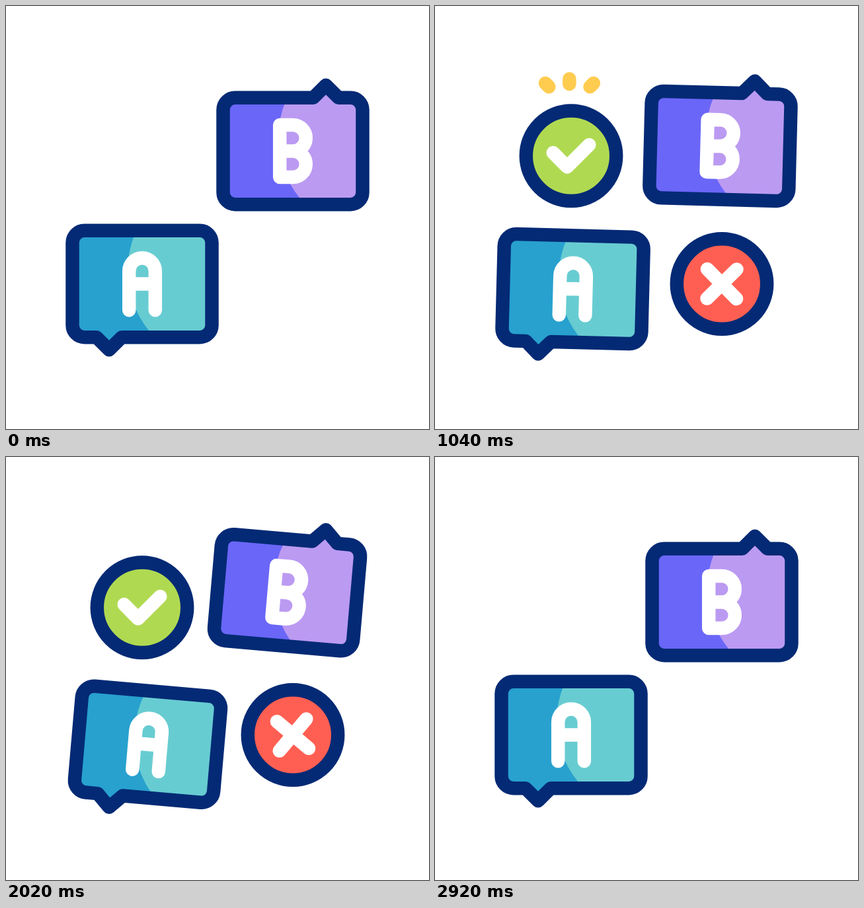
Recreate the animation shown at these times as an HTML page with a canvas. Size 640 px wide and 640 px high, loop 3.6 s.

```html
<!DOCTYPE html>
<html lang="en">
<head>
<meta charset="utf-8">
<title>A or B</title>
<style>
  html, body { margin: 0; width: 100%; height: 100%; overflow: hidden; background: #fff; }
  canvas { display: block; width: 100vmin; height: 100vmin; }
</style>
</head>
<body>
<canvas id="stage" width="640" height="640"></canvas>
<script>
const ctx = document.getElementById('stage').getContext('2d');
const LOOP = 3600, STEP = 20;
const NAVY = '#042a75', LINE = 20.5;
const BURSTS = [50, 80, 110];

const ease = t => {
  t = Math.min(1, Math.max(0, t));
  return t * t * (3 - 2 * t);
};
const span = (f, from, to) => ease((f - from) / (to - from));

// Eased interpolation through [frame, value] keys
function track(keys, f) {
  let value = keys[0][1];
  for (let i = 1; i < keys.length; i++) {
    const [f0, v0] = keys[i - 1], [f1, v1] = keys[i];
    if (f >= f0) value = v0 + (v1 - v0) * span(f, f0, f1);
  }
  return value;
}

const tilt = [[0, 0], [20, 5], [40, -5], [60, 5], [80, -5], [100, 5], [120, 0]];
const hop = [0, 1, 0, 1, 0, 1, 0].map((v, i) => [i * 20, v * 9.6]);
const tickY = [[17, 420.5], [50, 227.8]];
const crossY = [[20, 214.5], [50, 420.5], [120, 420.5], [150, 214.5]];
const crossTurn = [];
for (const b of BURSTS) {
  tickY.push([b, 227.8], [b + 10, 217.2]);
  if (b < 110) tickY.push([b + 20, 227.8]);
  crossTurn.push([b, 0], [b + 10, 5], [b + 20, -5], [b + 30, 0]);
}
tickY.push([121.4, 217.2], [150, 420.5]);

// Bubble outline, with the tail tip at the origin
const bubble = new Path2D();
{
  const l = -55.5, r = 155.5, t = -180.5, b = -19.1, q = 18.2;
  bubble.moveTo(0, 0);
  bubble.lineTo(b, b);
  bubble.arcTo(l, b, l, t, q);
  bubble.arcTo(l, t, r, t, q);
  bubble.arcTo(r, t, r, b, q);
  bubble.arcTo(r, b, l, b, q);
  bubble.lineTo(-b, b);
  bubble.closePath();
}
const flipped = new Path2D();
flipped.addPath(bubble, new DOMMatrix([-1, 0, 0, -1, 0, 0]));

// Letters, relative to the bubble centre
const letterA = new Path2D();
letterA.moveTo(-19.8, 39.8);
letterA.lineTo(-19.8, -19.4);
letterA.arc(0, -19.4, 19.8, Math.PI, 0);
letterA.lineTo(19.8, 39.8);
letterA.moveTo(-19.8, 0);
letterA.lineTo(19.8, 0);

const letterB = new Path2D();
letterB.moveTo(-19.8, 0);
letterB.lineTo(-19.8, -39.6);
letterB.lineTo(0, -39.6);
letterB.arc(0, -19.8, 19.8, -Math.PI / 2, Math.PI / 2);
letterB.arc(0, 19.8, 19.8, -Math.PI / 2, Math.PI / 2);
letterB.lineTo(-19.8, 39.6);
letterB.closePath();
letterB.moveTo(-19.8, 0);
letterB.lineTo(0, 0);

const tick = new Path2D('M-27.3-4.7L-6.2 16.7L27.3-16.8');
const cross = new Path2D('M-22.3-22.3L22.3 22.3M22.3-22.3L-22.3 22.3');

const rays = [
  [203.3, 117.9, 0, -1],
  [172.3, 122.2, -Math.SQRT1_2, -Math.SQRT1_2],
  [234.5, 122.2, Math.SQRT1_2, -Math.SQRT1_2]
];

function stroke(path, color) {
  ctx.strokeStyle = color;
  ctx.stroke(path);
}

function drawBubble(x, y, deg, shape, cx, cy, dark, light, letter) {
  ctx.save();
  ctx.translate(x, y);
  ctx.rotate(deg * Math.PI / 180);
  ctx.fillStyle = dark;
  ctx.fill(shape);
  ctx.save();
  ctx.clip(shape);
  ctx.beginPath();
  ctx.arc(cx + 123, cy - 20.3, 145, 0, Math.PI * 2);
  ctx.fillStyle = light;
  ctx.fill();
  ctx.restore();
  stroke(shape, NAVY);
  ctx.translate(cx, cy);
  stroke(letter, '#fff');
  ctx.restore();
}

function drawBadge(x, y, color, mark, deg) {
  ctx.save();
  ctx.translate(x, y);
  ctx.beginPath();
  ctx.arc(0, 0, 68.2, 0, Math.PI * 2);
  ctx.fillStyle = color;
  ctx.fill();
  ctx.strokeStyle = NAVY;
  ctx.stroke();
  ctx.rotate(deg * Math.PI / 180);
  stroke(mark, '#fff');
  ctx.restore();
}

function drawRays(f) {
  ctx.strokeStyle = '#ffcc50';
  for (const b of BURSTS) {
    const head = 52.8 * span(f, b - 0.5, b + 10);
    const tail = 52.8 * span(f, b + 9, b + 19.5);
    if (head - tail < 0.05) continue;
    ctx.beginPath();
    for (const [x, y, dx, dy] of rays) {
      ctx.moveTo(x + dx * tail, y + dy * tail);
      ctx.lineTo(x + dx * head, y + dy * head);
    }
    ctx.stroke();
  }
}

function draw(f) {
  ctx.fillStyle = '#fff';
  ctx.fillRect(0, 0, 640, 640);
  ctx.lineWidth = LINE;
  ctx.lineCap = ctx.lineJoin = 'round';

  const deg = track(tilt, f), dy = track(hop, f);
  drawRays(f);
  if (f > 16 && f < 150) {
    drawBadge(206, track(tickY, f), '#b0d952', tick, 0);
    drawBadge(434, track(crossY, f), '#ff5f52', cross, track(crossTurn, f));
  }
  drawBubble(156, 520.3 + dy, deg, bubble, 50, -99.8, '#28a1ce', '#67ccd1', letterA);
  drawBubble(484, 119.7 - dy, deg, flipped, -50, 99.8, '#6a66f8', '#bb9af2', letterB);
}

const start = performance.now();
function tickFrame() {
  const t = Math.max(0, performance.now() - start) % LOOP;
  draw(Math.floor(t / STEP));
  requestAnimationFrame(tickFrame);
}
tickFrame();
</script>
</body>
</html>
```
